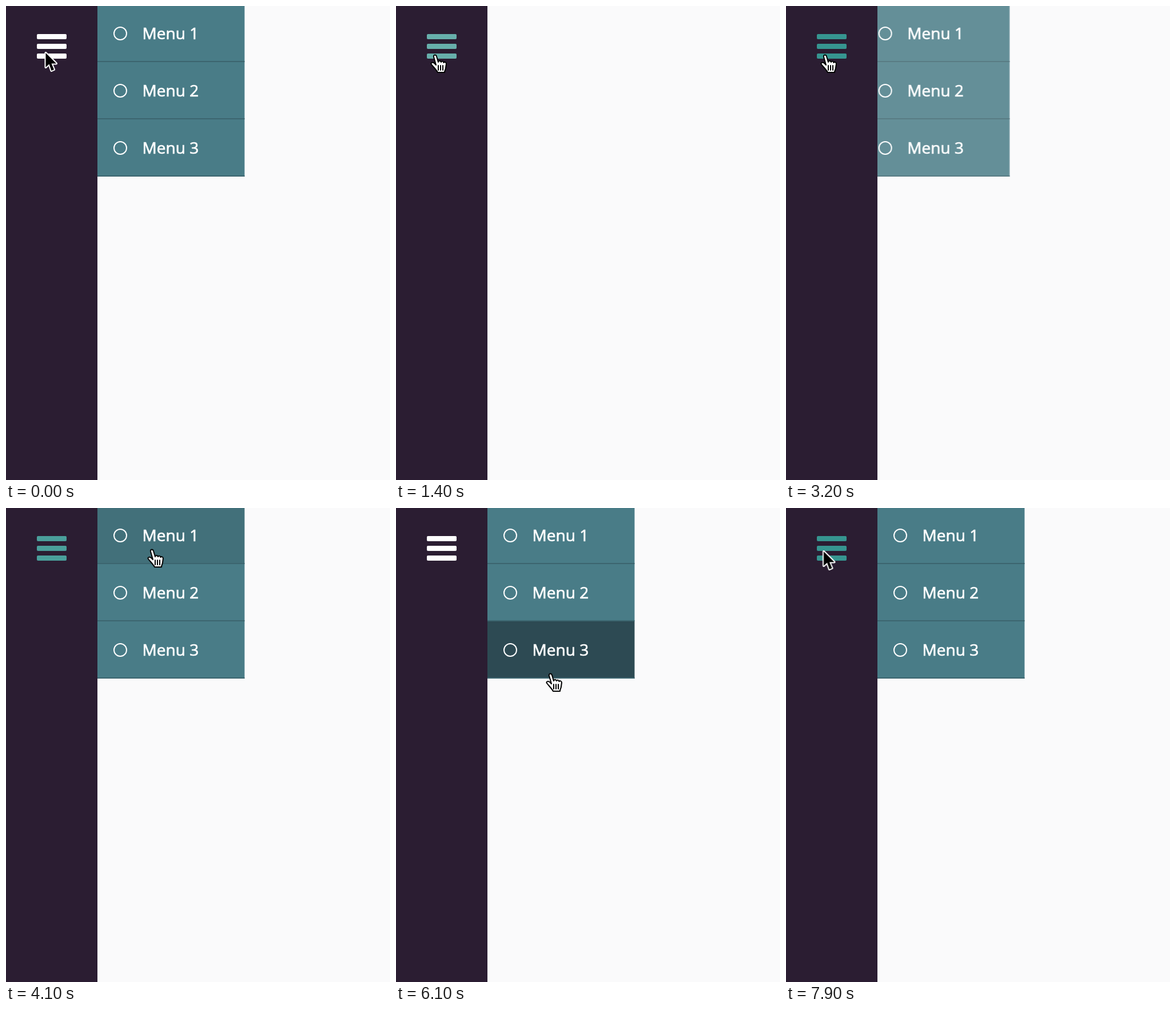
Animation of 672x828 px, one loop 8000 ms. Source, as an HTML page:

```html
<!DOCTYPE html>
<html lang="en">
<head>
<meta charset="utf-8">
<title>Slide-out menu</title>
<style>
  :root { --teal: #497c87; --dark: #2d4a53; --accent: #369590; }
  html, body { margin: 0; width: 100%; height: 100%; overflow: hidden; background: #fafafb; }
  svg { display: block; width: 672px; height: 828px; }

  .menu, .bars, .item, .cursor, .hand, .arrow { animation: 8s linear infinite; }
  .menu { animation-name: slide; }
  .bars { fill: #fff; animation-name: tint; }
  .item { fill: var(--teal); }
  .one { animation-name: hover-one; }
  .two { animation-name: hover-two; }
  .three { animation-name: hover-three; }
  .line { fill: #3c656f; }
  .ring { fill: none; stroke: #fff; stroke-width: 2; }
  text { font: 400 28px "Open Sans", sans-serif; fill: #fff; stroke: #fff; stroke-width: .7px; }

  .cursor { animation-name: travel; }
  .hand { animation-name: show-hand; }
  .arrow { animation-name: show-arrow; paint-order: stroke; }
  .hand, .arrow { animation-timing-function: step-end; }

  @keyframes slide {
    0%, 6.25% { transform: none; opacity: 1; animation-timing-function: ease; }
    12.5%, 36.25% { transform: translateX(-180px); opacity: 0; animation-timing-function: ease; }
    43%, 100% { transform: none; opacity: 1; }
  }
  @keyframes tint {
    0%, 14.1% { fill: #fff; animation-timing-function: ease; }
    21.6%, 50.5% { fill: var(--accent); animation-timing-function: ease; }
    58%, 85% { fill: #fff; animation-timing-function: ease; }
    92.5%, 100% { fill: var(--accent); }
  }
  @keyframes hover-one {
    0%, 50.5% { fill: var(--teal); animation-timing-function: ease; }
    54.25% { fill: #33545d; animation-timing-function: ease; }
    61.75%, 100% { fill: var(--teal); }
  }
  @keyframes hover-two {
    0%, 54.25% { fill: var(--teal); animation-timing-function: ease; }
    61.75%, 66.5% { fill: var(--dark); animation-timing-function: ease; }
    74%, 100% { fill: var(--teal); }
  }
  @keyframes hover-three {
    0%, 66.5% { fill: var(--teal); animation-timing-function: ease; }
    74%, 83% { fill: var(--dark); animation-timing-function: ease; }
    90.5%, 100% { fill: var(--teal); }
  }
  @keyframes travel {
    0%, 12.5% { transform: translate(67px, 78px); }
    13.75%, 47.5% { transform: translate(68px, 86px); }
    51.25% { transform: translate(255px, 73px); }
    66.25% { transform: translate(266px, 197px); }
    76.25% { transform: translate(270px, 290px); }
    76.9%, 82.5% { transform: translate(270px, 293px); animation-timing-function: ease-out; }
    85%, 87.5% { transform: translate(76px, 44px); animation-timing-function: ease-in-out; }
    92.5%, 100% { transform: translate(63.5px, 72px); }
  }
  @keyframes show-hand {
    0% { opacity: 0; }
    13.75% { opacity: 1; }
    48.25% { opacity: 0; }
    49.4% { opacity: 1; }
    83.2%, 100% { opacity: 0; }
  }
  @keyframes show-arrow {
    0% { opacity: 1; }
    13.75% { opacity: 0; }
    48.25% { opacity: 1; }
    49.4% { opacity: 0; }
    83.2%, 100% { opacity: 1; }
  }
</style>
</head>
<body>
<svg viewBox="0 0 672 828">
  <g class="menu">
    <g>
      <rect class="item one" x="160" y="-2" width="257.5" height="100"/>
      <rect class="line" x="160" y="96" width="257.5" height="2"/>
      <circle class="ring" cx="200" cy="48" r="11"/>
      <text x="238.6" y="58">Menu 1</text>
    </g>
    <g transform="translate(0 100)">
      <rect class="item two" x="160" y="-2" width="257.5" height="100"/>
      <rect class="line" x="160" y="96" width="257.5" height="2"/>
      <circle class="ring" cx="200" cy="48" r="11"/>
      <text x="238.6" y="58">Menu 2</text>
    </g>
    <g transform="translate(0 200)">
      <rect class="item three" x="160" y="-2" width="257.5" height="100"/>
      <rect class="line" x="160" y="96" width="257.5" height="2"/>
      <circle class="ring" cx="200" cy="48" r="11"/>
      <text x="238.6" y="58">Menu 3</text>
    </g>
  </g>

  <rect width="160" height="828" fill="#2b1d32"/>
  <g class="bars">
    <rect x="54" y="49" width="52" height="9" rx="2"/>
    <rect x="54" y="66" width="52" height="9" rx="2"/>
    <rect x="54" y="83" width="52" height="9" rx="2"/>
  </g>

  <g class="cursor" stroke-linejoin="round">
    <path class="arrow" fill="#000" stroke="#fff" stroke-width="4"
      d="M2.5 4V29L8.5 23.5L12.5 35L17 33L12.5 22.5H21Z"/>
    <g class="hand" stroke="#000" stroke-width="2" stroke-linecap="round">
      <path fill="#fff" transform="translate(-7 -1)"
        d="M5 4C4 0 9 -1 10 3L13 13C13 10 17 10 18 13C19 11 22 11 22.5 14C23 12 27 13 27 16L26 23C26 26 24 27 24 31H12C10 27 5 22 1 17C-1 14 4 12 7 16L9 18Z"/>
      <path fill="none" stroke-width="2" d="M6 18V26M10 18V26M14 18V26"/>
    </g>
  </g>
</svg>
</body>
</html>
```
